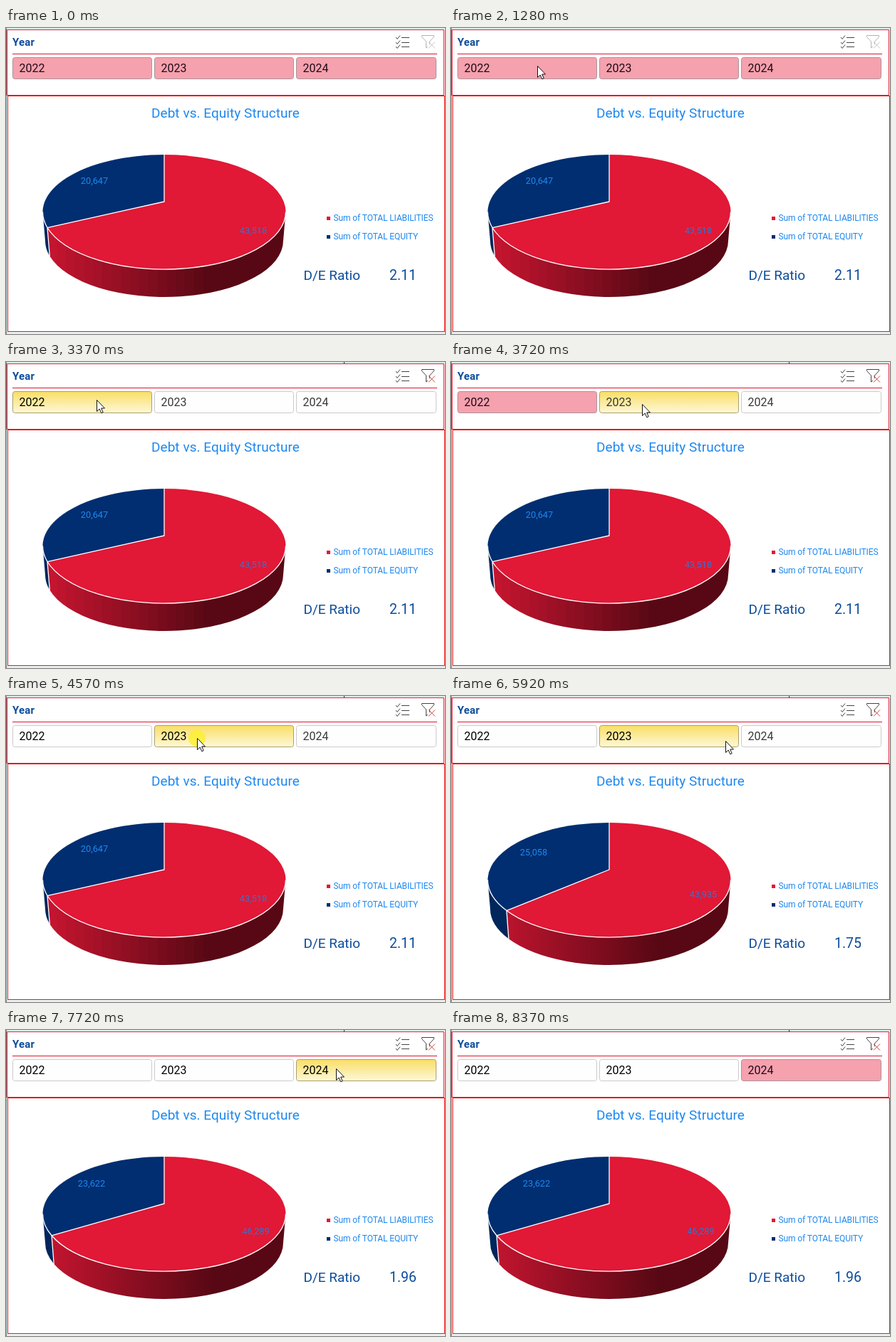
An HTML page that plays this animation: 616x430 px, repeating every 8.65 s.

```html
<!DOCTYPE html>
<html lang="en">
<head>
<meta charset="utf-8">
<title>Debt vs. Equity Structure</title>
<style>
  html, body { margin: 0; width: 100%; height: 100%; overflow: hidden; background: #fff; }
  svg { display: block; width: 616px; height: 430px; font-family: Roboto, Arial, sans-serif; }
  .line { fill: none; stroke-width: 1; }
  .red { stroke: #e0142c; }
  .accent { fill: #1e88ee; }
  .navy { fill: #0d4c9c; }
  .year { font-size: 16px; }
  .label { font-size: 12.8px; text-anchor: middle; }
  .legend { font-size: 12px; letter-spacing: -.1px; }
</style>
</head>
<body>
<svg viewBox="0 0 616 430">
  <defs>
    <linearGradient id="hover" x2="0" y2="1">
      <stop stop-color="#f9de66"/><stop offset="1" stop-color="#fef8d8"/>
    </linearGradient>
    <linearGradient id="banded" gradientUnits="userSpaceOnUse" x1="58" x2="290"/>
    <linearGradient id="smooth" gradientUnits="userSpaceOnUse" x1="58" x2="290"/>
  </defs>
  <rect width="616" height="430" fill="#fff"/>
  <path class="line" stroke="#d4d4d4" d="M0 .5H616M0 428.5H616"/>
  <path class="line" stroke="#777" d="M.5 0V430"/>
  <path id="tick" class="line" stroke="#333" d="M474.5 0V2"/>
  <path class="line red" d="M1.5 2.5H614.5V94.5H1.5ZM9 36.5H605"/>
  <rect class="line" x="2.5" y="95.5" width="613" height="331" stroke="#e81414"/>

  <text class="navy" x="9" y="25" font-size="15" font-weight="700" letter-spacing=".2">Year</text>
  <path class="line" stroke="#444" stroke-width="1.3"
    d="M547 13l2 2.5 4-5M547 20l2 2.5 4-5M547 26l2 2.5 4-5M555 13.5H566M555 20.5H566M555 26.5H566"/>
  <path id="funnel" class="line" stroke-width="1.2" d="M583.5 10.5H600.5V12.5L594.5 19V23M583.5 10.5V12.5L589.5 19V28L592 26"/>
  <path id="cross" class="line" stroke-width="1.3" d="M593 19.5l9 9M602 19.5l-9 9"/>
  <g id="buttons"></g>

  <text class="accent" x="204" y="126" font-size="19" letter-spacing=".05">Debt vs. Equity Structure</text>
  <path id="redWall"/>
  <path id="blueWall" fill="#00265c"/>
  <path id="redTop" fill="#e11836"/>
  <path id="blueTop" fill="#002e70"/>
  <path id="edges" fill="none" stroke="#fff" stroke-width="1.3" stroke-linejoin="round"/>
  <text id="equity" class="label accent"></text>
  <text id="debt" class="label" fill="#3475cc"></text>

  <rect x="450" y="265" width="5" height="5" fill="#e11836"/>
  <rect x="450" y="291" width="5" height="5" fill="#002e70"/>
  <text class="legend accent" x="459.5" y="271">Sum of TOTAL LIABILITIES</text>
  <text class="legend accent" x="459.5" y="297">Sum of TOTAL EQUITY</text>
  <text class="navy" x="417.5" y="354" font-size="19">D/E Ratio</text>
  <text id="ratio" class="navy" x="538" y="354" font-size="19.5"></text>

  <circle id="click" r="12" fill="#fbf032" opacity=".85"/>
  <path id="cursor" fill="#fff" stroke="#111" d="M.5 .5V16.5L4.2 13 6.8 18.8 9.2 17.7 6.7 12H11.5Z"/>
</svg>
<script>
const LOOP = 8650;
const $ = id => document.getElementById(id);

function make(tag, attrs, parent) {
  const node = document.createElementNS('http://www.w3.org/2000/svg', tag);
  set(node, attrs);
  return parent.appendChild(node);
}
function set(node, attrs) {
  for (const key in attrs) node.setAttribute(key, attrs[key]);
}
const show = (id, on) => $(id).setAttribute('visibility', on ? 'visible' : 'hidden');

// Shading of the curved wall: 0 = lit left side, 1 = dark right side.
function shade(p) {
  const mix = (a, b) => Math.round(a + (b - a) * p);
  return `rgb(${mix(196, 88)},${mix(21, 8)},${mix(48, 20)})`;
}
const BANDS = 18;
for (let i = 0; i < BANDS; i++) {
  const color = shade(i / (BANDS - 1));
  make('stop', { offset: i / BANDS, 'stop-color': color }, $('banded'));
  make('stop', { offset: (i + 1) / BANDS, 'stop-color': color }, $('banded'));
}
make('stop', { offset: 0, 'stop-color': shade(0) }, $('smooth'));
make('stop', { offset: 1, 'stop-color': shade(1) }, $('smooth'));

const buttons = [9, 208, 407].map((x, i) => {
  const width = i < 2 ? 195 : 196;
  const box = make('rect', { x: x + .5, y: 41.5, width, height: 30, rx: 3 }, $('buttons'));
  const text = make('text', { x: x + 9.5, y: 62, class: 'year' }, $('buttons'));
  text.textContent = 2022 + i;
  return { box, text, x, right: x + width };
});

// split: x of the slice boundary on the rim; labels as [text, x, y].
const charts = [
  { split: 58, wall: 'banded', equity: ['20,647', 124, 219], debt: ['43,518', 347, 289] },
  { split: 78, wall: 'smooth', equity: ['25,058', 116, 224], debt: ['43,935', 354, 283] },
  { split: 64, wall: 'smooth', equity: ['23,622', 120, 220], debt: ['46,289', 350.5, 287] }
];
const ratios = ['2.11', '1.75', '1.96'];

function drawChart({ split, wall, equity, debt }) {
  const cx = 222, top = { cy: 258.5, rx: 170.5, ry: 80.5 }, base = { cy: 299, rx: 167, ry: 79 };
  const cos = (split - cx) / top.rx, sin = Math.sqrt(1 - cos * cos);
  const at = (e, c, s) => `${cx + e.rx * c} ${e.cy + e.ry * s}`;
  const arc = (e, flags, to) => `A${e.rx} ${e.ry} 0 ${flags} ${to}`;
  const edge = at(top, cos, sin), foot = at(base, cos, sin);
  const left = at(top, -1, 0), right = at(top, 1, 0);
  const hub = `${cx} 244`, peak = `${cx} 178`;
  set($('redWall'), {
    d: `M${edge}${arc(top, '0 0', right)}L${at(base, 1, 0)}${arc(base, '0 1', foot)}Z`,
    fill: `url(#${wall})`
  });
  set($('blueWall'), { d: `M${left}${arc(top, '0 0', edge)}L${foot}${arc(base, '0 1', at(base, -1, 0))}Z` });
  set($('redTop'), { d: `M${hub}L${peak}${arc(top, '1 1', edge)}Z` });
  set($('blueTop'), { d: `M${hub}L${edge}${arc(top, '0 1', peak)}Z` });
  set($('edges'), { d: `M${peak}L${hub}L${edge}L${foot}M${left}${arc(top, '0 0', edge)}${arc(top, '0 0', right)}` });
  for (const [id, [text, x, y]] of [['equity', equity], ['debt', debt]]) {
    $(id).textContent = text;
    set($(id), { x, y });
  }
}

const easeInOut = p => p < .5 ? 4 * p ** 3 : 1 - 4 * (1 - p) ** 3;
const easeOut = p => Math.sin(p * Math.PI / 2);
const easeIn = p => p ** 1.4;

// Pointer moves in discrete steps; "via" bends the path.
const moves = [
  { start: 660, end: 1280, steps: 10, from: [450, 392], to: [121, 53], ease: easeOut },
  { start: 2410, end: 2670, steps: 4, from: [121, 53], to: [124, 53], ease: easeOut },
  { start: 3370, end: 3720, steps: 6, from: [124, 53], to: [268, 59], ease: easeInOut },
  { start: 5710, end: 6190, steps: 7, from: [268, 59], to: [456, 65], ease: easeOut },
  { start: 7720, end: 8370, steps: 10, from: [456, 65], to: [596, 431], via: [540, -85], ease: easeIn }
];

function pointer(t) {
  const move = moves.filter(m => t >= m.start).pop();
  if (!move) return null;
  const { start, end, steps, from, to, ease } = move;
  const step = Math.min(steps, 1 + Math.floor((t - start) / (end - start) * (steps - 1) + 1e-6));
  const p = ease(step / steps);
  const via = move.via || from.map((v, i) => (v + to[i]) / 2);
  return from.map((v, i) => (1 - p) ** 2 * v + 2 * p * (1 - p) * via[i] + p * p * to[i]);
}

const within = (t, a, b) => t >= a && t < b;
const stage = (t, first, second) => t < first ? 0 : t < second ? 1 : 2;

function drawSlicer(t, pos) {
  const filtered = t >= 1630;
  const selected = stage(t, 4570, 6460);
  buttons.forEach(({ box, text, x, right }, i) => {
    const hover = t >= 1550 && pos && pos[0] >= x && pos[0] <= right && pos[1] >= 41 && pos[1] <= 72;
    const chosen = !filtered || i === selected;
    set(box, {
      fill: hover ? 'url(#hover)' : chosen ? '#f5a1ae' : '#fefefe',
      stroke: hover ? '#aaa06c' : chosen ? '#a8959a' : '#cacaca'
    });
    set(text, { fill: filtered && i > selected ? '#383838' : chosen && !hover ? '#200a18' : '#000' });
  });
  const active = t >= 2490;
  set($('funnel'), { stroke: active ? '#444' : '#b4b4b4' });
  set($('cross'), { stroke: active ? '#c8433c' : '#c4c4c4' });
  show('tick', filtered);
}

let current = -1;
function render(t) {
  const pos = pointer(t);
  drawSlicer(t, pos);
  show('cursor', pos);
  show('click', within(t, 1550, 2490) || within(t, 4570, 4780) || within(t, 6460, 6670));
  if (pos) {
    const transform = `translate(${pos.map(Math.round)})`;
    set($('cursor'), { transform });
    set($('click'), { transform });
  }
  $('ratio').textContent = ratios[stage(t, 4870, 6790)];
  const index = stage(t, 5030, 6990);
  if (index !== current) drawChart(charts[current = index]);
}

const began = performance.now();
function tick() {
  render((performance.now() - began) % LOOP);
  requestAnimationFrame(tick);
}
tick();
</script>
</body>
</html>
```
